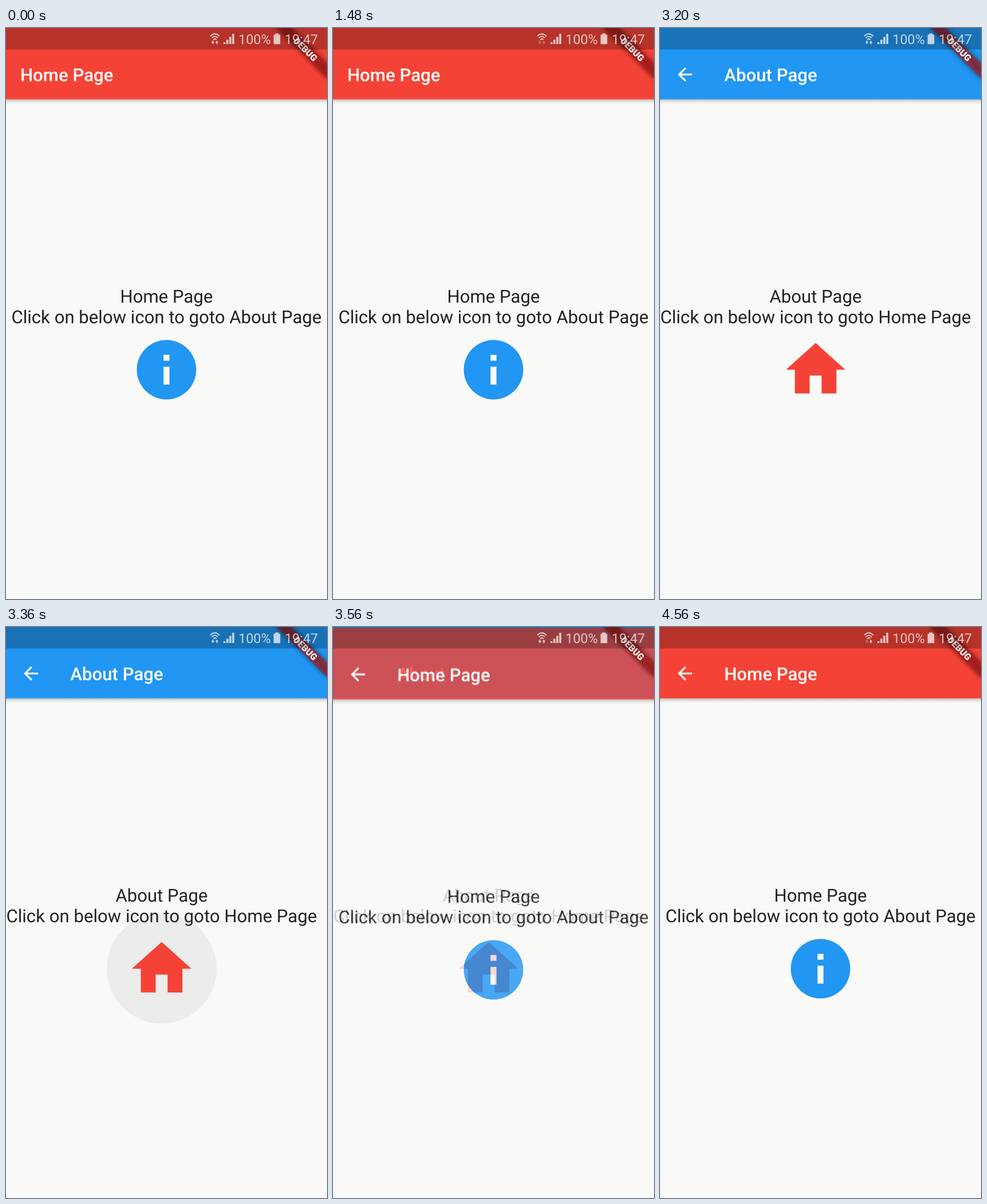
Animation, 561 px wide and 998 px high, one loop 4720 ms. Source, as an HTML page:

```html
<!DOCTYPE html>
<html lang="en">
<head>
<meta charset="utf-8">
<title>Page navigation</title>
<style>
  html, body { margin: 0; width: 100%; height: 100%; overflow: hidden; background: #f9f9f8; }
  svg { display: block; width: 100%; height: 100%; }
  text { font-family: Roboto, sans-serif; text-rendering: geometricPrecision; }
  .title { font-size: 31.17px; font-weight: 500; fill: #fff; }
  .body { font-size: 31.17px; fill: #212121; text-anchor: middle; }
  .status { font-size: 23.4px; }
  .banner { font-size: 15.9px; font-weight: 900; fill: #fff; text-anchor: middle; }
</style>
</head>
<body>
<svg viewBox="0 0 561 998">
  <defs>
    <linearGradient id="shade" x2="0" y2="1">
      <stop offset="0" stop-opacity=".27"/>
      <stop offset=".4" stop-opacity=".1"/>
      <stop offset="1" stop-opacity="0"/>
    </linearGradient>
    <filter id="blur" x="-30%" y="-150%" width="160%" height="400%">
      <feGaussianBlur stdDeviation="5"/>
    </filter>
  </defs>

  <g id="pages"></g>

  <g transform="translate(561 0) rotate(45)">
    <rect x="-62.3" y="43.6" width="124.6" height="18.7" fill-opacity=".5" filter="url(#blur)"/>
    <rect x="-62.3" y="43.6" width="124.6" height="18.7" fill="#b71c1c" fill-opacity=".627"/>
    <text class="banner" y="58.7">DEBUG</text>
  </g>

  <rect width="561" height="37.5" fill-opacity=".25"/>
  <g fill="#fff" opacity=".72">
    <g fill="none" stroke="#fff" stroke-width="2">
      <path d="M357 14.2Q365 6.4 373 14.2M359.6 17.4Q365 12.2 370.4 17.4M362.2 20.4Q365 17.8 367.8 20.4"/>
    </g>
    <path id="down" d="M360.5 22v2.6h-1.8l2.8 3.6 2.8-3.6h-1.8V22z"/>
    <path id="up" d="M367.5 28.2v-2.6h-1.8l2.8-3.6 2.8 3.6h-1.8v2.6z"/>
    <path d="M380 25h3.6v3H380zM385.1 20.5h3.6V28h-3.6zM390.2 15.5h3.6V28h-3.6zM395.3 10h3.6V28h-3.6z"/>
    <text class="status" x="406.3" y="28">100%</text>
    <path d="M470.5 9.5h6v2.2h2.8V28.2h-11.6V11.7h2.8z"/>
    <text class="status" x="487" y="28">19:47</text>
  </g>
</svg>

<script>
const LOOP = 4720, STEP = 40, PAGE_HEIGHT = 998;
const PUSH = 1720;
const SLIDE = { visible: 3400, start: 3295, length: 300 };
const PRESS = 3230, RELEASE = 3294, INK_RADIUS = 96;

const icons = {
  back: 'M20 11H7.83l5.59-5.59L12 4l-8 8 8 8 1.41-1.41L7.83 13H20z',
  info: 'M12 2a10 10 0 1 0 0 20 10 10 0 1 0 0-20zM13 17h-2v-6h2zM13 9h-2V7h2z',
  home: 'M10 20v-6h4v6h5v-8h3L12 3 2 12h3v8z'
};

const icon = (name, x, y, scale, color) =>
  `<path d="${icons[name]}" fill="${color}" fill-rule="evenodd"
    transform="translate(${x} ${y}) scale(${scale}) translate(-12 -12)"/>`;

const ink = (id, x, color) =>
  `<circle id="${id}" cx="${x}" cy="597.2" r="${INK_RADIUS}" fill="${color}" opacity="0"/>`;

const page = ({ id, name, other, color, accent, symbol, center, back, pressed }) => `
  <g id="${id}">
    <rect width="561" height="${PAGE_HEIGHT}" fill="#f9f9f8"/>
    <rect y="124.7" width="561" height="8" fill="url(#shade)"/>
    <rect width="561" height="124.7" fill="${color}"/>
    ${back ? icon('back', 43.6, 81.2, 1.558, '#fff') : ''}
    ${pressed ? ink('highlight', center, '#bcbcbc') + ink('splash', center, '#c8c8c8') : ''}
    <text class="title" x="${back ? 112.2 : 24.9}" y="92.8">${name} Page</text>
    <text class="body" x="${center}" y="480.2">${name} Page</text>
    <text class="body" x="${center}" y="516">Click on below icon to goto ${other} Page</text>
    ${icon(symbol, center, 597.2, 5.195, accent)}
  </g>`;

const red = '#f44336', blue = '#2196f3';
const homePage = { name: 'Home', other: 'About', color: red, accent: blue, symbol: 'info', center: 280.5 };
const aboutPage = { name: 'About', other: 'Home', color: blue, accent: red, symbol: 'home', center: 272 };

const $ = id => document.getElementById(id);
$('pages').innerHTML =
  page({ ...homePage, id: 'root' }) +
  page({ ...aboutPage, id: 'about', back: true, pressed: true }) +
  page({ ...homePage, id: 'pushed', back: true });

const clamp = x => Math.min(1, Math.max(0, x));

// Cubic Bezier easing with control points (x1, 0) and (x2, 1).
const bezier = (x1, x2) => x => {
  let low = 0, high = 1;
  for (let i = 0; i < 24; i++) {
    const s = (low + high) / 2, r = 1 - s;
    if (3 * s * r * r * x1 + 3 * s * s * r * x2 + s ** 3 < x) low = s; else high = s;
  }
  return low * low * (3 - 2 * low);
};
const slideEase = bezier(.4, .2);
const fadeEase = bezier(.42, 1);

// Time, download arrow lit, upload arrow lit.
const traffic = [
  [0, 1, 1], [520, 0, 1], [1480, 0, 0], [2560, 0, 1],
  [3200, 1, 1], [3640, 0, 0], [4400, 1, 1], [4560, 0, 1]
];

const show = (id, visible) => $(id).setAttribute('display', visible ? 'inline' : 'none');

// The splash grows slowly while held, then quickly as it fades after release.
function drawInk(time) {
  const held = clamp((time - PRESS) / 1000);
  const released = clamp((time - RELEASE) / 62);
  const fade = clamp((time - RELEASE) / 200);
  const glow = Math.min(time - PRESS, 2 * RELEASE - PRESS - time) / 200;
  $('splash').setAttribute('r', INK_RADIUS * clamp(held + released));
  $('splash').setAttribute('opacity', time < PRESS ? 0 : .4 * (1 - fade));
  $('highlight').setAttribute('opacity', .4 * clamp(glow));
}

function draw(now) {
  const time = Math.floor((now % LOOP) / STEP) * STEP;
  const progress = clamp((time - SLIDE.start) / SLIDE.length);
  const sliding = time >= SLIDE.visible;

  show('root', time < PUSH);
  show('about', time >= PUSH && progress < 1);
  show('pushed', sliding);
  drawInk(time);
  if (sliding) {
    const drop = PAGE_HEIGHT / 4 * (1 - slideEase(progress));
    $('pushed').setAttribute('transform', `translate(0 ${drop.toFixed(2)})`);
    $('pushed').setAttribute('opacity', fadeEase(progress).toFixed(3));
  }

  const [, down, up] = traffic.findLast(([from]) => time >= from);
  $('down').setAttribute('opacity', down ? 1 : .4);
  $('up').setAttribute('opacity', up ? 1 : .4);
}

const began = performance.now();
function tick() {
  draw(performance.now() - began);
  requestAnimationFrame(tick);
}
tick();
</script>
</body>
</html>
```
